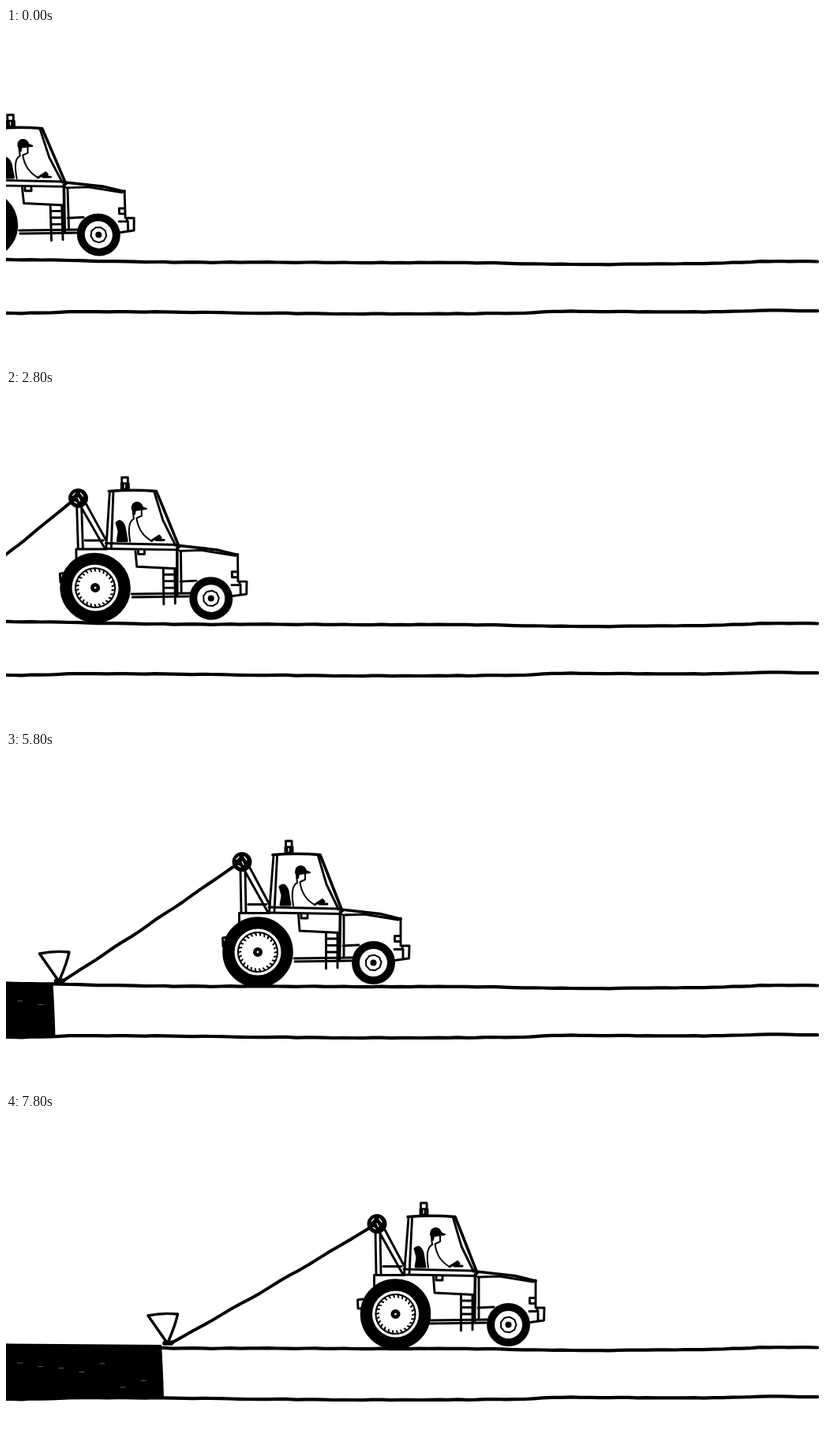
Write an HTML page that moves like this. It is 1030 by 424 pixels and loops after 8000 ms.

```html
<!DOCTYPE html>
<html lang="en">
<head>
<meta charset="utf-8">
<title>Tractor on a road</title>
<style>
html, body { margin: 0; width: 100%; height: 100%; overflow: hidden; background: #fff; }
svg { display: block; width: 100vw; height: 100vh; }
.ink { fill: none; stroke: #000; stroke-linecap: round; stroke-linejoin: round; }
.white { fill: #fff; }
.black { fill: #000; }
.bold { stroke-width: 3.6; }
.fine { stroke-width: 2; }
.light { stroke: #fff; stroke-width: 1.3; }
.plain { stroke: none; }
</style>
</head>
<body>
<svg viewBox="0 0 1030 424">
  <g class="ink" stroke-width="4.2">
    <path id="fill" class="black plain"/>
    <path id="flecks" stroke="#777" stroke-width=".8"/>
    <path id="top"/>
    <path id="bottom"/>
    <path id="rope" stroke-width="4"/>
  </g>

  <g id="cone" class="ink" stroke-width="3.4">
    <path class="white" d="M0 256 Q17 252 37.5 254 Q35 267 25.5 289 H23 Z"/>
    <path class="black" d="M20 290 L32 289 L30 292 H20 Z"/>
  </g>

  <g id="tractor" class="ink" stroke-width="2.9">
    <g id="winch">
      <path d="M468 150 L469 204 M474 150 L475 203 M473 150 L502 202 M480 147 L505 194 M478 193.5 H501"/>
      <circle class="black" cx="470" cy="139.5" r="11"/>
      <path class="light" d="M463 136 L466 133 M473 133 L476 137 M465 144 L468 146 M470 139 L472 143"/>
      <path d="M505 204.5 H466.5 V218 M452 235 L445.5 236 L446 247 H451"/>
    </g>

    <g id="cab">
      <rect x="525.5" y="113" width="7.6" height="8"/>
      <rect class="black" x="525" y="121" width="9" height="7"/>
      <path class="light" d="M529 122.5 V126"/>
      <path class="bold" d="M509 130.5 Q540 128 569 130.5 L583 166 L597 202"/>
      <path d="M510 131 L504.5 203 M514.5 132 L511 202 M566.5 132 L577 168 L592 199"/>
    </g>

    <g id="body">
      <path d="M504 197 L592 199 M504 204 L596 205.5 M598 207 L625 206 L668 213"/>
      <path class="bold" d="M592 199.5 L645 205.5 L671 212"/>
      <path d="M671 211 V246 M671 233.5 H663.5 V240.5 H671"/>
      <path d="M663 250.5 H673 V246 H682 L681.5 262 L664 264.5 M674 250 V262"/>
      <path d="M541.5 207 L543 227 L594 229.5 M545 206 V211 H553 V206"/>
      <path class="bold" d="M594.5 203 L593.5 264"/>
      <path d="M599 208 V259 M598 246 L618 245 M536 262 L610 261 M537 266 L608 265"/>
      <path id="ladder"/>
    </g>

    <g id="driver">
      <path class="black" d="M518 171 Q524 165 528 176 L531 194 H519 L521 182 Z"/>
      <path class="black fine" d="M538 153 Q538 145 545 145 Q550 146 551 151 L556 153 L542 155 L541 160 Z"/>
      <path class="fine" d="M550 154 V162 L543.5 165 Q546 185 562 194 M539 157 L540 166 Q531 170 535 195"/>
      <path d="M562 194 L572 187.5 L574 190 L568 193 H578"/>
    </g>

    <g id="rear">
      <circle class="black" r="43.3"/>
      <circle class="white plain" r="29.5"/>
      <g id="rearHub">
        <circle class="fine" r="25"/>
        <path id="ticks" class="fine"/>
      </g>
      <circle class="black" r="4.6"/>
      <circle class="white plain" r="1.4"/>
    </g>
    <g id="front">
      <circle class="black" r="26"/>
      <circle class="white plain" r="17.5"/>
      <path id="frontHub" class="fine"/>
      <circle class="black" r="2.6"/>
    </g>
  </g>
</svg>

<script>
const $ = id => document.getElementById(id);
const set = (id, name, value) => $(id).setAttribute(name, value);
const LOOP = 8000, STEP = 200;

// [time, x] pairs; both move evenly between them
const drive = [[0, -523], [1200, -457], [1800, -439], [3600, -330], [4800, -240],
  [5800, -171], [6000, -139], [6600, -94.5], [7800, 0]];
const pull = [[0, -275], [3600, -94], [4800, -18], [5800, 42.5], [6000, 47], [6600, 97.5], [7800, 180]];

// [x, y] of the bends in the two road lines
const topEdge = [[-4, 294], [225, 297.4], [560, 297.9], [740, 300.1], [880, 299], [970, 296.3], [1034, 296.4]];
const bottomEdge = [[-4, 362.3], [110, 360.2], [470, 362.8], [640, 362.3], [710, 359.7], [890, 360.4], [960, 358.6], [1034, 359.1]];

const clamp = u => Math.max(0, Math.min(1, u));
const ramp = (t, from, to) => clamp((t - from) / (to - from));
const smooth = u => u * u * (3 - 2 * u);

function along(points, at, ease = u => u) {
  let i = 0;
  while (i < points.length - 2 && at > points[i + 1][0]) i++;
  const [x0, y0] = points[i], [x1, y1] = points[i + 1];
  return y0 + (y1 - y0) * ease(ramp(at, x0, x1));
}

function random(seed) {
  return () => (seed = seed * 16807 % 2147483647) / 2147483647;
}

function line(points) {
  return "M" + points.map(p => p[0].toFixed(1) + " " + p[1].toFixed(1)).join("L");
}

// Even points round a circle
function circle(n, r, turn = 0) {
  return Array.from({ length: n }, (_, i) => {
    const a = i / n * Math.PI * 2 + turn;
    return [r * Math.cos(a), r * Math.sin(a)];
  });
}

function roadLine(bends, seed) {
  const rnd = random(seed), points = [];
  for (let x = -4; x <= 1034; x += 12) points.push([x, along(bends, x, smooth) + rnd() * .8 - .4]);
  return line(points);
}

function ropeLine(x0, y0, x1, y1) {
  const points = [];
  for (let u = 0; u <= 1.001; u += .05) {
    const sag = (1.6 + Math.sin(u * 25) * .6) * Math.sin(u * Math.PI);
    points.push([x0 + (x1 - x0) * u, y0 + (y1 - y0) * u + sag]);
  }
  return line(points);
}

function fleckLines(edge) {
  const rnd = random(77);
  let d = "";
  for (let x = 15; x < edge - 12; x += 26) d += `M${x} ${(316 + rnd() * 36).toFixed(1)}h6`;
  return d;
}

function build() {
  set("top", "d", roadLine(topEdge, 5));
  set("bottom", "d", roadLine(bottomEdge, 9));

  const inner = circle(26, 21.5, .05);
  set("ticks", "d", circle(26, 25).map((p, i) => line([p, inner[i]])).join(""));
  set("frontHub", "d", line(circle(9, 10)) + "Z");

  let ladder = "M576.5 230V275M591 230V274";
  for (let y = 237; y < 260; y += 8.5) ladder += `M577 ${y}H590`;
  set("ladder", "d", ladder);
}

function draw(now) {
  const t = Math.floor(now / STEP) * STEP;
  const x = along(drive, t), cone = along(pull, t);
  const lean = .03 * (1 - ramp(t, 1800, 3600));
  const lift = -3 * (1 - ramp(t, 1800, 5000));
  const slip = -3.5 * (1 - ramp(t, 6000, 7800));
  const edge = cone + 20;

  set("tractor", "transform", `matrix(1 0 ${lean} ${1 - lean / 2} ${x - 140 * lean} ${lift + 65 * lean})`);
  set("rear", "transform", `translate(${493.5 + slip} 254)`);
  set("front", "transform", "translate(636.5 267.5)");
  set("rearHub", "transform", `rotate(${x / 44 * 57.3})`);
  set("frontHub", "transform", `rotate(${x / 27 * 57.3})`);

  set("cone", "transform", `translate(${cone} 0)`);
  set("rope", "d", ropeLine(x + 460, 145 + lift, cone + 29, 291));
  set("fill", "d", edge > 0 ? `M-2 291.5 L${edge - 3} 293 Q${edge - 1} 325 ${edge} 361 L-2 363Z` : "");
  set("flecks", "d", fleckLines(edge));
}

function tick() {
  draw(performance.now() % LOOP);
  requestAnimationFrame(tick);
}

build();
tick();
</script>
</body>
</html>
```
